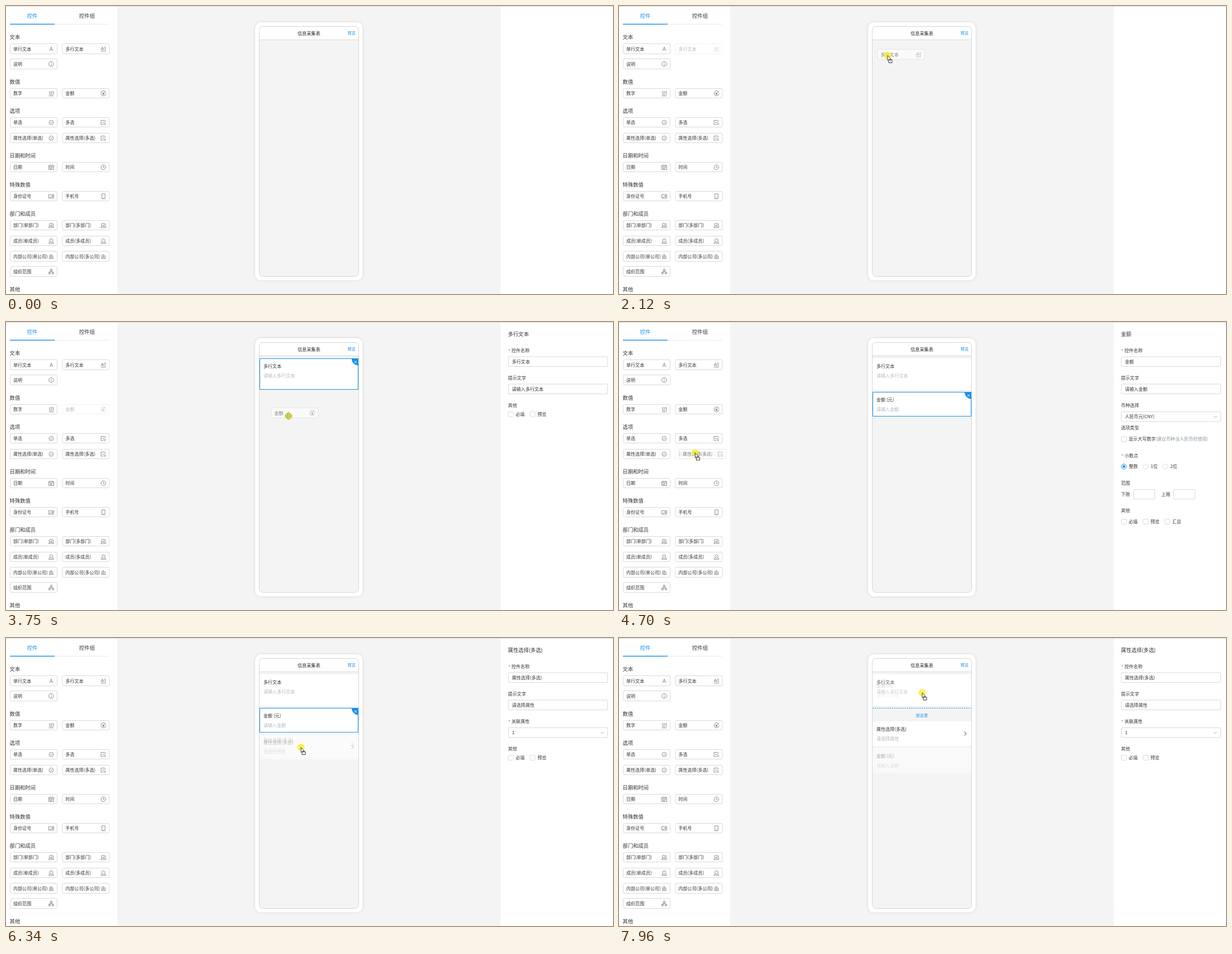
These frames come from a looping animation (1087 by 515 pixels, 8000 ms). An HTML page with a canvas:

```html
<!DOCTYPE html>
<html lang="zh-CN">
<head>
<meta charset="utf-8">
<title>表单设计器</title>
<style>
html, body { margin: 0; width: 100%; height: 100%; overflow: hidden; background: #fff; }
canvas { display: block; }
</style>
</head>
<body>
<canvas id="stage" width="1087" height="515"></canvas>
<script>
const ctx = document.getElementById('stage').getContext('2d');
const LOOP = 8000, BLUE = '#1890ec', INK = '#333', LINE = '#d9d9d9', HINT = '#b4b8bc', BACK = '#f4f4f4';
const FAMILY = '"Noto Sans CJK SC", "Noto Sans CJK", "Noto Sans", sans-serif';
const SMALL = 7.2, BODY = 8.05, HEAD = 9.3;
const LEFT = 454.5, RIGHT = 630.5; // form field edges

const ring = r => `M${-r} 0a${r} ${r} 0 1 0 ${2 * r} 0a${r} ${r} 0 1 0 ${-2 * r} 0`;
const icons = {
  letter: 'M-2.6 3.5L0 -3.5L2.6 3.5M-1.7 1.2H1.7',
  lines: 'M-4.5 4H4.5M1.2 -3.3H4.5M1.2 -1H4.5M1.8 1.3H4.5M-4.3 2.2L-1.9 -3.6L.6 2.2M-3.5 .3H-.3',
  info: ring(4.4) + 'M0 -.8V2.8M0 -2.8V-1.8',
  digits: 'M-4.5 4.4H4.5M-4 -2.4L-3 -3.4V2.2M-1.3 -2.3q0 -1.1 1.1 -1.1t1.1 1.2q0 1 -2.2 4.3h2.3M2 -3.4h2.2l-1.3 2.1q1.5 0 1.5 1.8t-2.5 1.5',
  yen: 'M3.6 -2.6A4.4 4.4 0 1 0 4.4 .5M1.5 -4.1A4.4 4.4 0 0 1 4.4 -.8M-1.9 -2.2L0 0L1.9 -2.2M0 0V2.8M-1.8 .2H1.8M-1.8 1.5H1.8',
  tick: ring(3.9) + 'M-1.9 0L-.4 1.4L2 -1.2',
  checks: 'M2.5 -3.8H-4.3V3.6H-.3M-2.4 -1L-.4 1L4.6 -3.6M1 3.8H4.5M1 1.8H4.5',
  date: 'M-4.4 -3.2H4.4V4.1H-4.4ZM-4.4 -1H4.4M-2 -4.4V-2.8M2 -4.4V-2.8M-2.5 1H2.5M-2.5 2.6H1',
  clock: ring(4.2) + 'M0 -2.4V.3H2.2',
  card: 'M-4.4 -3H4.4V3.2H-4.4ZM1 -1H3V.8H1ZM-3 1.5H-.5',
  phone: 'M-2.8 -4.4H2.8V4.4H-2.8ZM-.8 3H.8',
  group: 'M-3.6 -1.4a2.5 2.5 0 1 0 5 0a2.5 2.5 0 1 0 -5 0M-4.6 4q0 -2.7 2.4 -2.7h2.3q2.4 0 2.4 2.7ZM1.6 -3.8a2.4 2.4 0 0 1 1.2 4.3q1.9 .8 1.9 2.9h-1.5',
  person: 'M-2.9 -1.1a2.9 2.9 0 1 0 5.8 0a2.9 2.9 0 1 0 -5.8 0M-2 1.6q-2.4 .6 -2.4 2.5H4.4q0 -1.9 -2.4 -2.5',
  building: 'M-2.9 3.6V-2L.4 -3.6V3.6M.4 -1H3V3.6M-4 3.6H4M-1.3 -1V2',
  tree: 'M-1.4 -4.2h2.8v2.8h-2.8ZM-4.4 1.7h2.8v2.6h-2.8ZM1.6 1.7h2.8v2.6h-2.8ZM0 -1.4V.2M-3 1.7V.2H3V1.7',
};
for (const name in icons) icons[name] = new Path2D(icons[name]);

const headings = [['文本', 55], ['数值', 135], ['选项', 187], ['日期和时间', 267], ['特殊数值', 319], ['部门和成员', 371], ['其他', 506]];
const rows = [
  [76.5, '单行文本', 'letter', '多行文本', 'lines'],
  [103.5, '说明', 'info'],
  [156, '数字', 'digits', '金额', 'yen'],
  [208, '单选', 'tick', '多选', 'checks'],
  [236, '属性选择(单选)', 'tick', '属性选择(多选)', 'checks'],
  [288, '日期', 'date', '时间', 'clock'],
  [340, '身份证号', 'card', '手机号', 'phone'],
  [392, '部门(单部门)', 'group', '部门(多部门)', 'group'],
  [420, '成员(单成员)', 'person', '成员(多成员)', 'person'],
  [447.5, '内部公司(单公司)', 'building', '内部公司(多公司)', 'building'],
  [474.5, '组织范围', 'tree'],
];
const widgets = rows.flatMap(([y, a, iconA, b, iconB]) =>
  [{ name: a, icon: iconA, x: 7, y }, b && { name: b, icon: iconB, x: 100.5, y }].filter(Boolean));

// pointer moves: start, end, steps, control point, end point
const moves = [
  [200, 950, 12, -150, 75, 63, 71],
  [1020, 1350, 6, 100, 96, 119, 78.5],
  [1490, 2120, 10, 300, 124, 481, 88.5],
  [2260, 2730, 8, 300, 140, 132, 161.5],
  [2880, 3750, 14, 320, 152, 506, 168],
  [3820, 4430, 10, 300, 215, 129, 234],
  [4700, 5460, 12, 320, 234, 510, 235.5],
  [6000, 6260, 5, 518, 220, 528, 200],
  [6330, 6750, 7, 530, 160, 533, 126],
  [7020, 7300, 5, 536, 165, 543, 200],
  [7500, 7960, 8, 543, 150, 543, 98],
];
// widget drags: start, drop, widget, grab point
const drags = [
  [1490, 2260, '多行文本', 119, 78.5],
  [2880, 3820, '金额', 132, 161.5],
  [4700, 5530, '属性选择(多选)', 129, 234],
];
const presses = [[1490, 2260], [2880, 3820], [4500, 5800], [6260, 6880], [7370, LOOP]];
const dropCursor = [[1490, 2260], [2950, 3690], [4700, 5400], [6330, 6880], [7500, LOOP]];
const within = (t, spans) => spans.some(([a, b]) => t >= a && t < b);

function pointer(t) {
  let x = 984, y = 508;
  for (const [start, end, steps, cx, cy, ex, ey] of moves) {
    if (t < start) break;
    const k = Math.min(steps, Math.floor((t - start) * (steps - 1) / (end - start) + 1e-6) + 1) / steps;
    const u = k * k * (3 - 2 * k), v = 1 - u;
    x = v * v * x + 2 * u * v * cx + u * u * ex;
    y = v * v * y + 2 * u * v * cy + u * u * ey;
  }
  return { x, y };
}

function text(str, x, y, size = BODY, color = INK, align = 'left') {
  ctx.font = `${size}px ${FAMILY}`;
  ctx.textAlign = align;
  ctx.fillStyle = color;
  ctx.fillText(str, x, y + size * 0.37);
}
function box(x, y, w, h, r, fill, stroke) {
  ctx.beginPath();
  ctx.roundRect(x, y, w, h, r);
  if (fill) { ctx.fillStyle = fill; ctx.fill(); }
  if (stroke) { ctx.strokeStyle = stroke; ctx.lineWidth = 1; ctx.stroke(); }
}
function line(color, width, ...points) {
  ctx.beginPath();
  for (let i = 0; i < points.length; i += 2) ctx.lineTo(points[i], points[i + 1]);
  ctx.strokeStyle = color;
  ctx.lineWidth = width;
  ctx.stroke();
}
function disc(x, y, r, fill, stroke) {
  ctx.beginPath();
  ctx.arc(x, y, r, 0, 7);
  if (fill) { ctx.fillStyle = fill; ctx.fill(); }
  if (stroke) { ctx.strokeStyle = stroke; ctx.lineWidth = 1; ctx.stroke(); }
}
function faded(alpha, draw) {
  ctx.save();
  ctx.globalAlpha = alpha;
  draw();
  ctx.restore();
}

function widget({ name, icon, x, y }, dx = 0, dy = 0) {
  const cy = y + dy, top = Math.floor(cy - 8.75) + 0.5, bottom = Math.floor(cy + 8.75) + 0.5;
  ctx.save();
  ctx.translate(x + dx, 0);
  box(0.5, top, 84, bottom - top, 2, '#fff', LINE);
  text(name, 6, cy + 0.3);
  ctx.translate(74, cy + 0.3);
  ctx.strokeStyle = '#666b72';
  ctx.lineWidth = 0.75;
  ctx.stroke(icons[icon]);
  ctx.restore();
}

function sidebar(t) {
  box(0, 0, 199, 515, 0, '#fff');
  line('#eaeaea', 1, 7, 32.5, 185, 32.5);
  line(BLUE, 1.4, 7, 32.5, 87, 32.5);
  text('控件', 47, 17.5, HEAD, BLUE, 'center');
  text('控件组', 145, 17.5, HEAD, INK, 'center');
  headings.forEach(([name, y]) => text(name, 6.6, y + 0.5, HEAD));
  const drag = drags.find(([a, b]) => t >= a && t < b);
  widgets.forEach(w => faded(drag && drag[2] === w.name ? 0.35 : 1, () => widget(w)));
}

const fields = {
  lines: { title: '多行文本', hint: '请输入多行文本', h: 55 },
  money: { title: '金额 (元)', hint: '请输入金额', h: 43 },
  attr: { title: '属性选择(多选)', hint: '请选择属性', h: 43, arrow: true },
};
function field(kind, y, active) {
  const { title, hint, h, arrow } = fields[kind];
  box(LEFT, y, RIGHT - LEFT, h, 0, '#fff', active ? BLUE : '#fff');
  text(title, 461, y + 13.5);
  text(hint, 461, y + 30.5, BODY, HINT);
  if (arrow) line(INK, 1, 618.5, y + 18, 622, y + 21.5, 618.5, y + 25);
  if (!active) return;
  ctx.beginPath();
  ctx.moveTo(RIGHT + 0.5, y);
  ctx.arc(RIGHT + 0.5, y, 12, Math.PI / 2, Math.PI);
  ctx.fillStyle = BLUE;
  ctx.fill();
  line('#fff', 1, 624, y + 4, 628, y + 8);
  line('#fff', 1, 628, y + 4, 624, y + 8);
}

// which fields exist, their order, selection and drag state
function formState(t) {
  const order = [];
  if (t >= 2260) order.push('lines');
  if (t >= 3820) order.push('money');
  if (t >= 5530) order.splice(t < 7020 ? 2 : 1, 0, 'attr');
  let active = t < 3820 ? 'lines' : t < 5530 ? 'money' : 'attr';
  if (within(t, [[6330, 7020], [7230, 7500]])) active = 'money';
  if (t >= 7770) active = '';
  const dragged = t >= 7500 ? 'money' : t >= 6330 && t < 7020 ? 'attr' : '';
  return { order, active, dragged, gap: within(t, [[6470, 7020], [7560, LOOP]]) };
}

function phone({ order, active, dragged, gap }) {
  box(199, 0, 687, 515, 0, BACK);
  ctx.save();
  ctx.shadowColor = 'rgba(0,0,0,.13)';
  ctx.shadowBlur = 5;
  box(446, 29, 192.5, 461.5, 10, '#fff');
  ctx.restore();
  box(453.5, 36.5, 178, 447, 7, BACK);
  box(453.5, 36.5, 178, 24, [7, 7, 0, 0], '#fff');
  line(LINE, 1, 453.5, 60.5, 631.5, 60.5);
  box(453.5, 36.5, 178, 447, 7, null, '#d4d4d4');
  text('信息采集表', 542.5, 48.5, BODY + 0.1, '#222', 'center');
  text('预览', 618.7, 48.5, SMALL, BLUE, 'center');

  let y = 65.5;
  order.forEach((kind, i) => {
    if (i === 1 && gap) {
      ctx.setLineDash([2.3, 1.5]);
      line(BLUE, 1, LEFT, y, RIGHT, y);
      line(BLUE, 1, LEFT, y + 24, RIGHT, y + 24);
      ctx.setLineDash([]);
      text('放这里', 542.3, y + 13, SMALL, BLUE, 'center');
      y += 24;
    }
    const top = y;
    faded(kind === dragged ? 0.4 : 1, () => field(kind, top, kind === active));
    y += fields[kind].h + 5;
  });
}

function label(str, y, required) {
  if (required) text('*', 899.5, y + 1, BODY, '#f04848');
  text(str, required ? 905.3 : 899, y);
}
function input(str, y, select) {
  box(899.5, y - 8.5, 178, 17.5, 1.5, '#fff', LINE);
  text(str, 906, y + 0.5);
  if (select) line('#b5b5b5', 0.9, 1065, y - 1, 1068, y + 2, 1071, y - 1);
}
function checks(y, ...names) {
  names.forEach((name, i) => {
    box(899.5 + 39 * i, y - 4.5, 9, 9, 1, '#fff', LINE);
    text(name, 912.8 + 39 * i, y);
  });
}

function panel(t) {
  box(886, 0, 201, 515, 0, '#fff');
  if (t < 2260) return;
  const [title, hint] = t < 3820 ? ['多行文本', '请输入多行文本']
    : t < 5530 ? ['金额', '请输入金额'] : ['属性选择(多选)', '请选择属性'];
  text(title, 899, 22, HEAD);
  label('控件名称', 51, true);
  input(title, 70.5);
  label('提示文字', 100);
  input(hint, 119.5);
  if (t < 3820) {
    label('其他', 149);
    checks(165, '必填', '预览');
  } else if (t < 5530) {
    label('币种选择', 149);
    input('人民币元(CNY)', 169, true);
    label('选项类型', 189);
    checks(209.5, '显示大写数字');
    text('(建议币种当人民币时使用)', 961, 209.5, BODY, '#8796a0');
    label('小数点', 239, true);
    [['整数', 904], ['1位', 943], ['2位', 978.3]].forEach(([name, x], i) => {
      disc(x, 258.5, 4.5, '#fff', i ? LINE : BLUE);
      if (!i) disc(x, 258.5, 2.4, BLUE);
      text(name, x + 9, 258.5);
    });
    label('范围', 288);
    [['下限', 899], ['上限', 971.3]].forEach(([name, x]) => {
      text(name, x, 308);
      box(Math.round(x) + 22.5, 299.5, 38, 17, 1.5, '#fff', LINE);
    });
    label('其他', 337);
    checks(357, '必填', '预览', '汇总');
  } else {
    label('关联属性', 149, true);
    input('1', 169, true);
    label('其他', 198.5);
    checks(214, '必填', '预览');
  }
}

const arrowShape = new Path2D('M0 0V9L2 7.1L3.4 10.2L4.7 9.6L3.4 6.7H6.2Z');
const moveShape = new Path2D('M0 -6.3L2.4 -3.8L0 -1.3L-2.4 -3.8ZM0 6.3L2.4 3.8L0 1.3L-2.4 3.8ZM-6.3 0L-3.8 -2.4L-1.3 0L-3.8 2.4ZM6.3 0L3.8 -2.4L1.3 0L3.8 2.4Z');

function ghosts(t, { x, y }, { dragged }) {
  const drag = drags.find(([a, b]) => t >= a && t < b);
  if (drag) {
    const [, , name, gx, gy] = drag;
    faded(0.6, () => widget(widgets.find(w => w.name === name), x - gx, y - gy));
  }
  if (dragged && !within(t, [[6880, 7020]])) faded(0.22, () => field(dragged, 173.5 + y - 200, false));
}

function cursor(t, { x, y }, { order }) {
  if (t < 200) return;
  const onWidget = widgets.some(w => x > w.x && x < w.x + 85 && Math.abs(y - w.y) < 9.5);
  const bottom = [0, 121, 169, 217][order.length];
  const onField = x > LEFT && x < RIGHT && y > 65 && y < bottom;
  const dropping = within(t, dropCursor);
  const moving = !dropping && (onWidget || onField || within(t, [[3690, 3820], [5400, 5800]]));
  const pressed = within(t, presses);
  if (pressed) faded(0.75, () => disc(x, y, 6.6, '#f6ee1c'));
  ctx.save();
  ctx.translate(x, y);
  ctx.lineWidth = moving ? 0.75 : 0.9;
  ctx.strokeStyle = moving ? '#4a4d50' : '#2b2b2b';
  ctx.fillStyle = moving && pressed ? '#f6ee6a' : '#fff';
  const shape = moving ? moveShape : arrowShape;
  ctx.fill(shape);
  ctx.stroke(shape);
  if (dropping) box(2, 8, 6, 5, 0, '#fff', '#333');
  ctx.restore();
}

function draw(now) {
  const t = now % LOOP, p = pointer(t), form = formState(t);
  phone(form);
  sidebar(t);
  panel(t);
  line('#dcdcdc', 1, 0, 0.5, 1087, 0.5);
  ghosts(t, p, form);
  cursor(t, p, form);
  requestAnimationFrame(() => draw(performance.now()));
}
draw(0);
</script>
</body>
</html>
```
